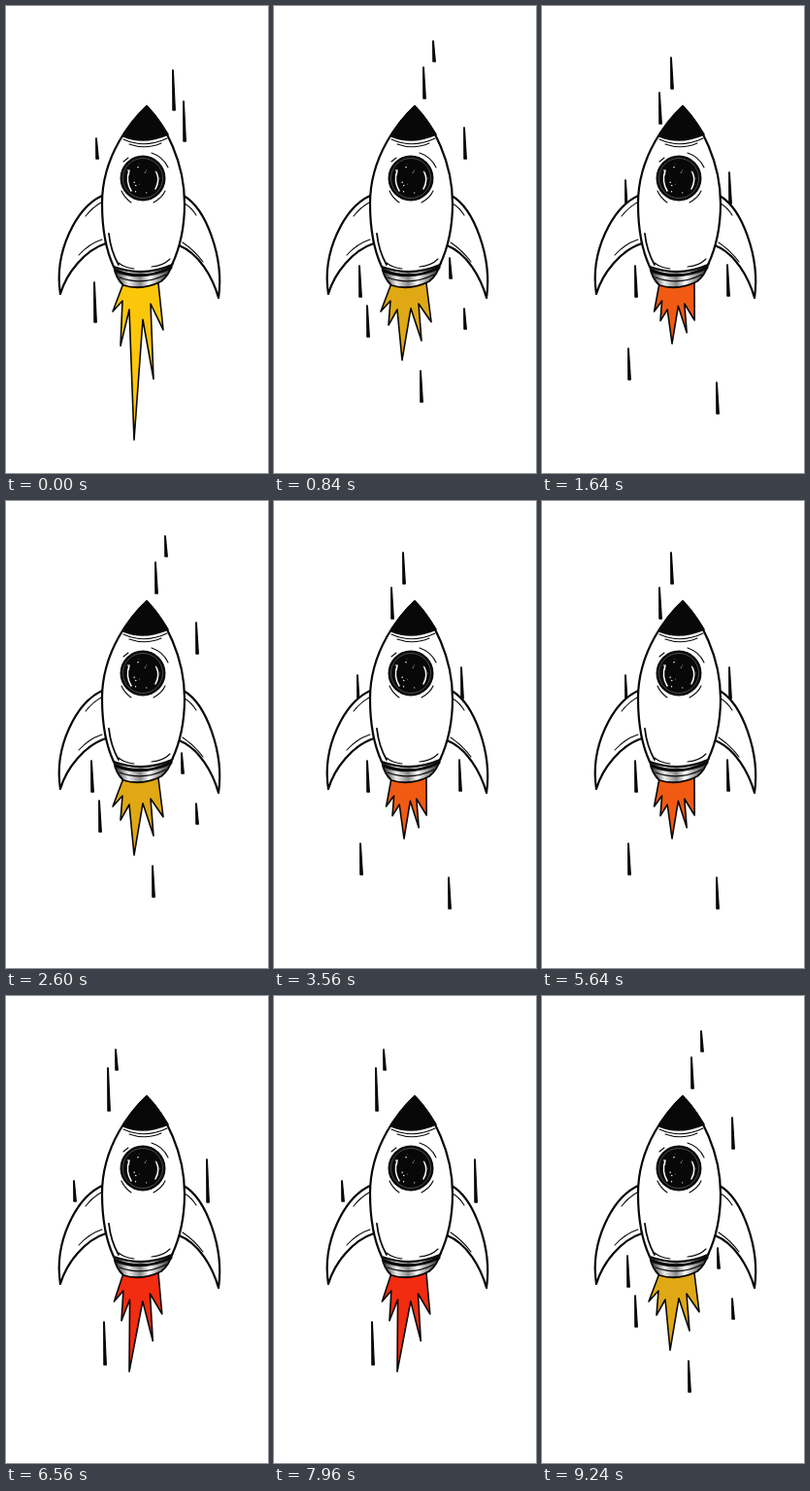
Animation of 270x480 px, one loop 9.28 s. Source, as an HTML page:

```html
<!DOCTYPE html>
<html lang="en">
<head>
<meta charset="utf-8">
<title>Rocket</title>
<style>
  html, body { margin: 0; width: 100%; height: 100%; overflow: hidden; background: #fff; }
  svg { display: block; width: 100%; height: 100%; }
  path { stroke: #080808; stroke-linecap: round; stroke-linejoin: round; fill: none; }
  #streaks { fill: #080808; stroke-width: 1.3; }
  #flame { stroke-width: 1.6; }
  .shell { fill: #fff; stroke-width: 2.2; }
  .solid { fill: #080808; stroke-width: 1.5; }
  .fine { stroke-width: 1.1; }
  .bold { stroke-width: 1.8; }
  .shine { stroke: #fff; stroke-width: 1.5; }
</style>
</head>
<body>
<svg viewBox="0 0 270 480">
  <defs>
    <linearGradient id="metal">
      <stop offset="0" stop-color="#111"/>
      <stop offset=".25" stop-color="#eee"/>
      <stop offset=".45" stop-color="#888"/>
      <stop offset=".6" stop-color="#fff"/>
      <stop offset="1" stop-color="#111"/>
    </linearGradient>
  </defs>

  <path id="streaks"/>
  <path id="flame"/>

  <!-- fins -->
  <path class="shell" d="M99 195C73 207 49 252 56 296C62 275 81 251 103 244Z"/>
  <path class="shell" d="M183 195C206 208 225 258 219 300C213 279 199 254 178 246Z"/>
  <path class="fine" d="M98 202Q89 207 82 216M99 240Q86 244 75 256M184 203Q191 207 196 215M182 243Q194 251 203 263"/>

  <!-- nozzle -->
  <path class="bold" d="M111 267Q141 280 172 264Q168 277 160 283Q140 293 121 287Q113 280 111 267Z" style="fill:url(#metal)"/>
  <path d="M113 272Q141 283 170 269" stroke-width="3"/>
  <path class="fine" d="M117 279Q141 288 165 276"/>

  <!-- body -->
  <path class="shell" d="M145 103C130 117 99 153 99 203C99 231 104 253 111 268Q142 279 171 266C180 247 184 226 184 203C184 160 164 122 145 103Z"/>
  <path class="solid" d="M145 103C136 111 127 122 121 134Q142 143 167 132Q157 115 145 103Z"/>
  <path class="fine" d="M121 137Q143 147 166 136M127 142Q144 148 160 141"/>
  <path class="bold" d="M106 234Q108 252 116 266"/>
  <path class="fine" d="M116 264Q122 269 132 270M150 268Q162 267 169 260"/>

  <!-- window -->
  <circle cx="141" cy="177" r="23.5" fill="#080808"/>
  <circle cx="141" cy="177" r="20.5" fill="none" stroke="#777" stroke-width=".6"/>
  <path class="fine" d="M150 151Q162 155 167 166M121 160L126 156M119 190Q122 197 129 202M152 202Q161 197 164 190"/>
  <path class="shine" d="M127 169Q123 180 129 190M155 171Q159 179 154 188"/>
  <g id="stars" fill="#fff"></g>
</svg>

<script>
const FRAME_MS = 40;
const LOOP_FRAMES = 232;
const CYCLE_FRAMES = 4.37;
const SHORT_STREAK = 21;

// flame length, x of its main tip, sideways spread; top points of the long and short streaks
const poses = [
  { color: '#fcc60a', length: 159, tipX: 132, spread: 1, longStreak: 41,
    long: [[172, 66], [183, 98], [91, 284]], short: [[93, 136]] },
  { color: '#f15a12', length: 60, tipX: 134, spread: .8, longStreak: 32,
    long: [[133, 53], [121, 89], [86, 179], [193, 171], [96, 267], [191, 266], [89, 352], [180, 387]], short: [] },
  { color: '#f22c10', length: 99, tipX: 127, spread: .95, longStreak: 44,
    long: [[105, 74], [207, 168], [101, 335]], short: [[113, 55], [70, 190]] },
  { color: '#f58c12', length: 111, tipX: 131, spread: .95, longStreak: 32,
    long: [[120, 59], [55, 150], [211, 120]], short: [] },
  { color: '#dfa814', length: 77, tipX: 132, spread: 1, longStreak: 32,
    long: [[154, 63], [196, 125], [88, 267], [96, 308], [151, 375]], short: [[164, 36], [181, 259], [196, 311]] }
];

const byId = id => document.getElementById(id);

const streakPath = length => ([x, y]) => `M${x - .3} ${y}h.6l2 ${length}h-2.4Z`;

// Side spikes grow more slowly than the main one.
function flamePath({ length, tipX, spread }) {
  const fan = dx => 138 + dx * spread;
  const points = [
    [121, 285],
    [fan(-28), 314], [fan(-18), 303],
    [fan(-20), 308 + .26 * length], [fan(-11), 312],
    [tipX, 287 + length], [fan(3), 300 + .14 * length],
    [fan(14), 307 + .48 * length], [fan(11), 306],
    [fan(24), 317 + .1 * length],
    [157, 285]
  ];
  return `M${points.join('L')}Z`;
}

function starField(count) {
  let seed = 7;
  const random = () => (seed = seed * 16807 % 2147483647) / 2147483647;
  return Array.from({ length: count }, () => {
    const angle = random() * 2 * Math.PI;
    const distance = 18 * Math.sqrt(random());
    const x = 141 + distance * Math.cos(angle);
    const y = 177 + distance * Math.sin(angle);
    return `<circle cx="${x}" cy="${y}" r="${.3 + .5 * random()}"/>`;
  }).join('');
}

function draw() {
  const frame = Math.floor(performance.now() / FRAME_MS) % LOOP_FRAMES;
  const pose = poses[Math.floor(frame * poses.length / CYCLE_FRAMES) % poses.length];
  const streaks = [...pose.long.map(streakPath(pose.longStreak)), ...pose.short.map(streakPath(SHORT_STREAK))];
  byId('streaks').setAttribute('d', streaks.join(''));
  byId('flame').setAttribute('d', flamePath(pose));
  byId('flame').style.fill = pose.color;
  requestAnimationFrame(draw);
}

byId('stars').innerHTML = starField(14);
draw();
</script>
</body>
</html>
```
